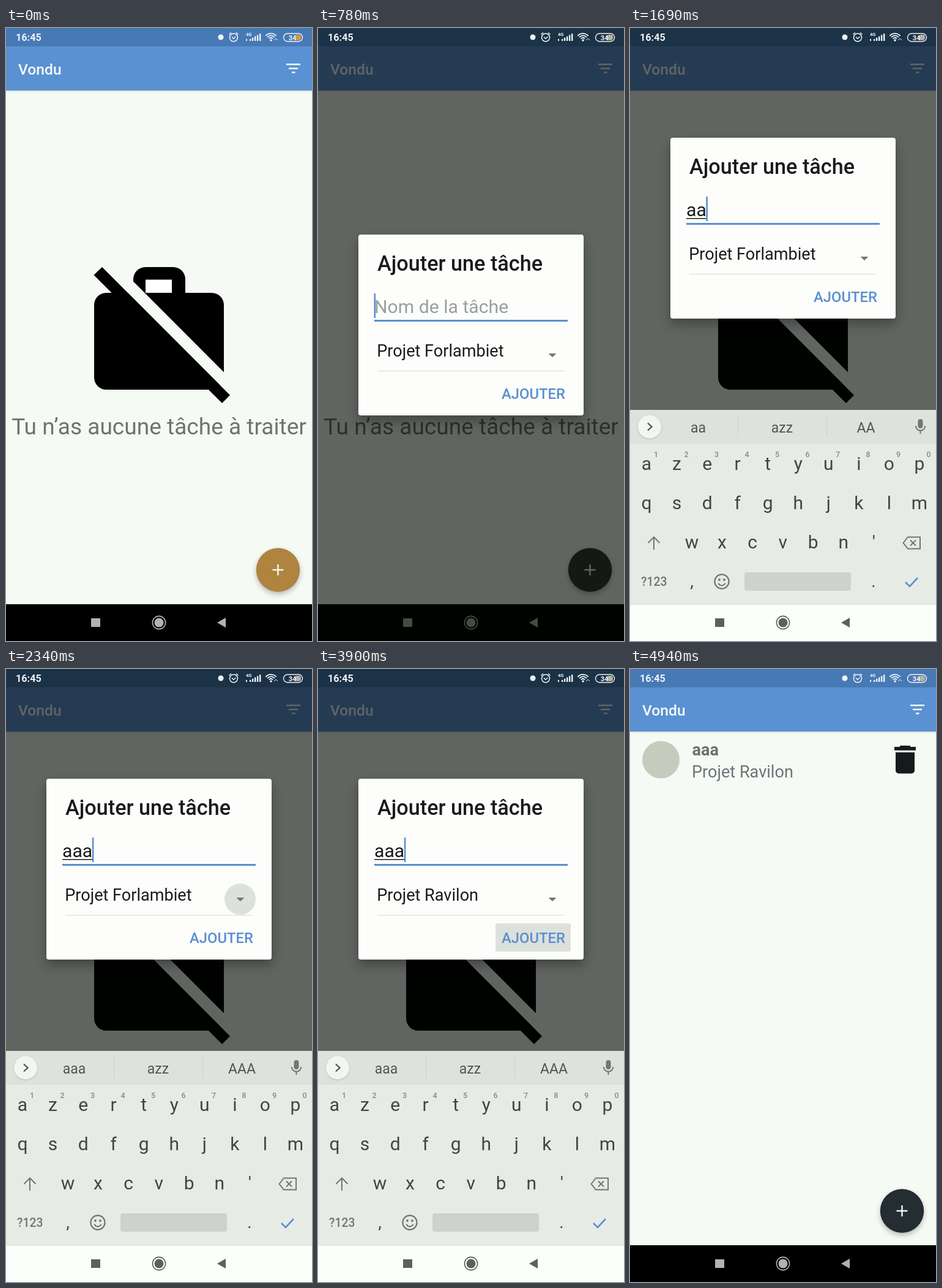
These frames come from a looping animation (500 by 1000 pixels, 5070 ms). An HTML page with a canvas:

```html
<!DOCTYPE html>
<html lang="fr">
<head>
<meta charset="utf-8">
<title>Tâches</title>
<style>
html, body { margin: 0; width: 100%; height: 100%; overflow: hidden; background: #f6faf5; }
canvas { display: block; width: 500px; height: 1000px; }
</style>
</head>
<body>
<canvas id="stage" width="500" height="1000"></canvas>
<script>
const g = document.getElementById('stage').getContext('2d');
const LOOP = 5070, STEP = 130, TAU = Math.PI * 2;
const BLUE = '#5a8fd0', PAPER = '#f6faf5', CARD = '#fdfefc', INK = '#191c1a';
const KEY = '#414643', ICON = '#707672', STRIP = '#dee2dc';
const APP = 'Vondu', FIRST = 'Projet Forlambiet', SECOND = 'Projet Ravilon';

function rect(x, y, w, h, color, r = 0) {
  g.fillStyle = color;
  g.beginPath();
  g.roundRect(x, y, w, h, r);
  g.fill();
}

function frame(x, y, w, h, color, width, r) {
  g.strokeStyle = color;
  g.lineWidth = width;
  g.beginPath();
  g.roundRect(x, y, w, h, r);
  g.stroke();
}

function disc(x, y, r, color) {
  g.fillStyle = color;
  g.beginPath();
  g.arc(x, y, r, 0, TAU);
  g.fill();
}

function ring(x, y, r, color, width, from = 0, to = TAU) {
  g.strokeStyle = color;
  g.lineWidth = width;
  g.beginPath();
  g.arc(x, y, r, from, to);
  g.stroke();
}

function trace(points) {
  g.beginPath();
  for (let i = 0; i < points.length; i += 2) g.lineTo(points[i], points[i + 1]);
}

function poly(color, ...points) {
  trace(points);
  g.fillStyle = color;
  g.fill();
}

function line(color, width, ...points) {
  trace(points);
  g.strokeStyle = color;
  g.lineWidth = width;
  g.stroke();
}

function text(s, x, y, size, color, weight = 400, align = 'left') {
  g.font = `${weight} ${size}px Roboto, sans-serif`;
  g.textAlign = align;
  g.fillStyle = color;
  g.fillText(s, x, y);
}

function shadow(color, blur, dy, draw) {
  g.save();
  g.shadowColor = color;
  g.shadowBlur = blur;
  g.shadowOffsetY = dy;
  draw();
  g.restore();
}

function statusIcons(charge) {
  const c = '#eef3f8';
  text('16:45', 16, 21, 16.2, c, 700);
  disc(351, 15, 4.5, c);
  ring(372, 15.5, 6.5, c, 1.5);
  line(c, 1.4, 369, 14.5, 372, 17.5, 375.5, 14);
  line(c, 1.6, 364.5, 10.5, 368, 7.5);
  line(c, 1.6, 376, 7.5, 379.5, 10.5);
  text('4G', 392, 13, 7.5, c, 700);
  rect(392, 18, 2, 3, c);
  for (let i = 0; i < 5; i++) rect(398 + i * 4, 18 - i * 2.2, 2.4, 3 + i * 2.2, c);
  for (let i = 0; i < 3; i++) ring(433, 20, 4 + i * 3.6, c, 1.8, -Math.PI * .78, -Math.PI * .22);
  disc(433, 20, 1.8, c);
  line(c, 1, 438, 20, 441, 17, 444, 20);
  rect(472, 11, 10, 9, charge, 4);
  frame(453.5, 9, 31, 13, c, 1.4, 6.5);
  text('34', 468, 19.5, 11, c, 700, 'center');
}

function appBar() {
  shadow('rgba(0,0,0,.16)', 3, 1, () => rect(0, 30, 500, 72, '#5a91d2'));
  rect(0, 0, 500, 30, '#4779b5');
  text(APP, 20, 76, 24.6, '#f6faf8', 500);
  rect(458, 58, 23, 2.6, '#f0f5f8');
  rect(462, 64.7, 15, 2.6, '#f0f5f8');
  rect(467, 71.2, 5.5, 2.6, '#f0f5f8');
}

function navBar(bg, c) {
  rect(0, 940, 500, 60, bg);
  rect(139, 963, 15, 14, c);
  ring(250, 970, 10.6, c, 1.6);
  disc(250, 970, 7.5, c);
  poly(c, 345, 970, 359, 962, 359, 978);
}

function emptyState() {
  rect(208, 390, 85, 60, '#000', [20, 20, 0, 0]);
  rect(144, 432, 212, 158, '#000', 20);
  rect(228, 410.5, 43, 21.5, '#fff');
  poly(PAPER, 172, 405, 199.5, 405, 372, 577.5, 372, 605);
  poly('#000', 157, 390, 366, 599, 353, 612, 143.5, 403);
  text('Tu n’as aucune tâche à traiter', 250, 663, 37.1, '#70746f', 400, 'center');
}

function taskRow() {
  disc(50.5, 148, 30.5, '#c6cbbe');
  text('aaa', 101.5, 140.5, 27, '#69736f', 700);
  text(SECOND, 101, 177, 27.1, '#6b7577');
  const c = '#151b1b';
  rect(441, 125, 17, 4, c);
  rect(432, 127, 35, 5.7, c);
  rect(434, 136, 31, 34.5, c, [0, 0, 5, 5]);
}

function addButton(color) {
  shadow('rgba(0,0,0,.26)', 8, 4, () => disc(444.5, 884, 35.7, color));
  rect(435.5, 882.8, 18, 2.4, '#f5f8f4');
  rect(443.3, 875, 2.4, 18, '#f5f8f4');
}

function gear(x, y) {
  disc(x, y, 8.6, ICON);
  for (let i = 0; i < 6; i++) {
    g.save();
    g.translate(x, y);
    g.rotate(i * TAU / 6);
    rect(-2.8, -11.5, 5.6, 6, ICON, 1);
    g.restore();
  }
  disc(x, y, 4.2, STRIP);
}

function palette(x, y) {
  disc(x, y, 10.8, ICON);
  poly(STRIP, x + 2, y + 12, x + 4, y + 6, x + 12, y + 5, x + 12, y + 12);
  for (const [dx, dy] of [[-6.5, -.5], [-3, -5.5], [3, -5.5], [6.5, -.5]]) disc(x + dx, y + dy, 1.8, STRIP);
}

function toolbarIcons() {
  gear(98, 651);
  palette(170, 651);
  frame(231, 641, 21, 14.5, ICON, 1.8, 1.5);
  for (let i = 0; i < 10; i++) rect(233.5 + i % 5 * 3.6, 643.5 + (i > 4) * 3.7, 2, 2, ICON);
  rect(237, 651.3, 9, 2, ICON);
  rect(232, 659.8, 19, 1.8, ICON);
  line(ICON, 2, 323, 652, 323, 641.5, 304, 641.5, 304, 660.5, 314, 660.5);
  poly(ICON, 311.5, 648, 321, 652, 324, 661.5, 317, 661.5, 313, 656);
  rect(357.5, 636, 1.2, 29, '#c6cbc6');
  for (let i = 0; i < 3; i++) disc(395 + i * 8, 651, 2.4, ICON);
}

function keyRow(keys, x, baseline) {
  [...keys].forEach((k, i) => text(k, x + i * 49.55, baseline, 30, KEY, 400, 'center'));
}

function keyboard(typed) {
  rect(0, 623, 500, 318, '#e7ebe6');
  rect(0, 623, 500, 55, STRIP);
  shadow('rgba(0,0,0,.18)', 3, 1, () => disc(32, 650.5, 19, '#f2f5f0'));
  const d = typed ? 1 : -1;
  line('#4b504d', 2.2, 32 - 3 * d, 644.5, 32 + 3.5 * d, 650.5, 32 - 3 * d, 656.5);
  if (typed) {
    [typed, 'azz', typed.toUpperCase()].forEach((w, i) =>
      text(w, 111.5 + i * 137, 660, 23, '#525754', 400, 'center'));
    rect(176, 634, 1, 32, '#cbd0cb');
    rect(321, 634, 1, 32, '#cbd0cb');
  } else {
    toolbarIcons();
  }
  rect(470.5, 638, 8, 15, ICON, 4);
  ring(474.5, 649, 7.7, ICON, 2, 0, Math.PI);
  rect(473.5, 656, 2, 6, ICON);

  keyRow('azertyuiop', 27, 721);
  keyRow('qsdfghjklm', 27, 785);
  keyRow("wxcvbn'", 101, 849);
  for (let i = 0; i < 10; i++) text((i + 1) % 10, 42.5 + i * 49.5, 700, 12.5, '#858b87', 500, 'center');

  line(ICON, 2, 39, 851, 39, 831);
  line(ICON, 2, 29.5, 840, 39, 830.5, 48.5, 840);
  trace([446.5, 840, 454, 830.5, 474, 830.5, 474, 849.5, 454, 849.5]);
  g.closePath();
  g.stroke();
  line(ICON, 2, 458, 835.5, 467, 844.5);
  line(ICON, 2, 467, 835.5, 458, 844.5);

  text('?123', 18, 910, 19.4, ICON, 500);
  text(',', 101, 912, 28, KEY, 400, 'center');
  text('.', 398, 912, 28, KEY, 400, 'center');
  ring(150, 903, 11.6, ICON, 2.2);
  disc(146, 900, 1.9, ICON);
  disc(154, 900, 1.9, ICON);
  ring(150, 903.5, 6, ICON, 2, .35, Math.PI - .35);
  rect(187, 888, 174, 30, '#cdd2ce', 4);
  line(BLUE, 2.6, 450, 904, 457, 911, 470, 897);
}

function dialog(s) {
  shadow('rgba(0,0,0,.32)', 18, 9, () => rect(66, 179, 368, 295, CARD, 4));
  text('Ajouter une tâche', 97, 238, 34.2, INK, 500);
  let end = 92;
  if (s.typed) {
    text(s.typed, 92, 307, 30.2, INK);
    end += g.measureText(s.typed).width;
    rect(92, 310, end - 92, 1.5, INK);
  } else {
    text('Nom de la tâche', 92, 307, 30.2, '#9ba09c');
  }
  if (s.caret) rect(end - .5, 275, 2.6, 40, BLUE);
  rect(92, 318, 316, 3, BLUE);
  if (s.arrowDown) disc(382.5, 375.5, 25.5, '#dde1dc');
  text(s.project, 96.2, 378, 27.1, INK);
  poly('#717572', 376.5, 373, 389.5, 373, 383, 379);
  rect(97, 401, 306, 1.2, '#dcdfdb');
  if (s.addDown) rect(290, 415, 123, 46, '#dde1dc', 3);
  text('AJOUTER', 300, 447, 23.8, BLUE, 500);
}

function dropdown() {
  shadow('rgba(0,0,0,.4)', 12, 5, () => rect(92, 337, 316, 133, CARD, 3));
  text(FIRST, 103, 380, 27.1, INK);
  text(SECOND, 103, 446, 27.1, INK);
}

function stateAt(t) {
  const on = (a, b) => t >= a && t < b;
  const menu = on(2470, 2860);
  const blinkFrom = t < 1430 ? 780 : t < 2470 ? 1950 : 2860;
  return {
    done: t >= 4030,
    dim: on(780, 4030) ? 1 : on(4030, 4160) ? .5 : 0,
    low: on(780, 910),
    keys: t < 910 ? 0 : t < 4160 ? 1 : on(4160, 4290) ? .4 : 0,
    typed: 'aaa'.slice(0, t < 1430 ? 0 : t < 1690 ? 1 : t < 1950 ? 2 : 3),
    project: t < 2860 ? FIRST : SECOND,
    menu,
    arrowDown: on(2340, 2470),
    addDown: on(3900, 4160),
    caret: !menu && (on(1430, 1950) || (t - blinkFrom) % 1000 < 500),
    fab: t < STEP ? '#ae843f' : t < 4030 ? '#383936' : '#232d32',
    charge: t < STEP ? '#d8984a' : '#b5b3a0'
  };
}

function draw(t) {
  const s = stateAt(t);
  rect(0, 0, 500, 1000, PAPER);
  if (s.done) taskRow(); else emptyState();
  addButton(s.fab);
  appBar();
  navBar('#000', '#b1b4ad');
  if (s.dim) {
    rect(0, 0, 500, 1000, `rgba(0,4,0,${.605 * s.dim})`);
    g.save();
    g.globalAlpha = s.dim;
    if (s.low) g.translate(0, 158);
    dialog(s);
    if (s.menu) dropdown();
    g.restore();
  }
  if (s.keys) {
    g.save();
    g.translate(0, (1 - s.keys) * 317);
    keyboard(s.typed);
    g.restore();
    if (s.keys === 1) {
      navBar('#fcfefb', '#5d615e');
      rect(0, 940, 500, 1, '#dfe3de');
    } else {
      navBar('#000', '#b1b4ad');
    }
  }
  statusIcons(s.charge);
}

const start = performance.now();
function tick() {
  const t = (performance.now() - start) % LOOP;
  draw(Math.floor(t / STEP) * STEP);
  requestAnimationFrame(tick);
}
tick();
</script>
</body>
</html>
```
